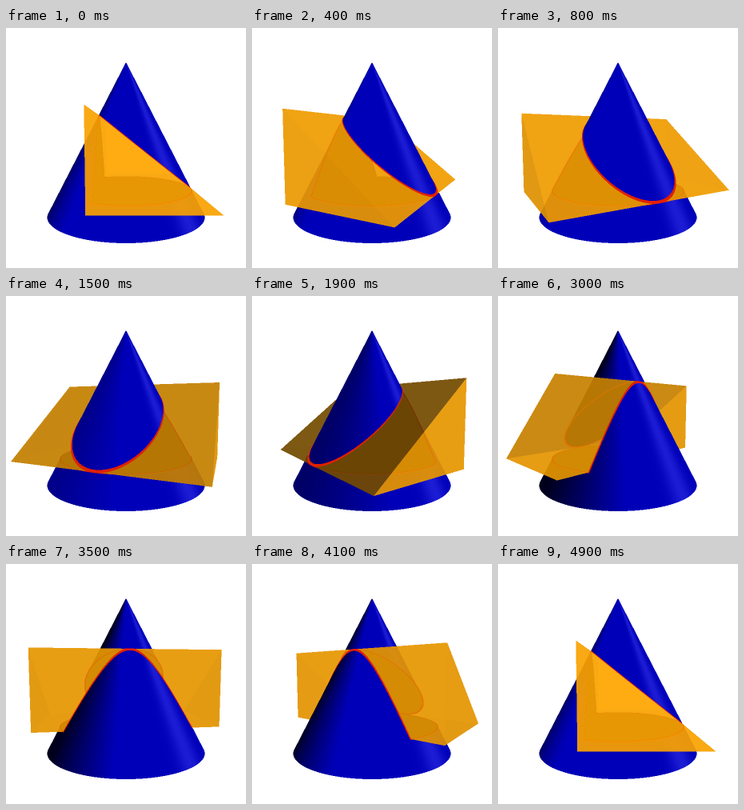
These frames come from a looping animation (300x300 px, 5 s). An HTML page with a canvas:

```html
<!DOCTYPE html>
<html lang="en">
<head>
<meta charset="utf-8">
<title>Cone cut by a wedge</title>
<style>
  html, body { margin: 0; width: 100%; height: 100%; overflow: hidden; background: #fff; }
  canvas { display: block; width: 300px; height: 300px; }
</style>
</head>
<body>
<canvas id="stage" width="300" height="300"></canvas>
<script>
const SIZE = 300, SUB = 2, STEPS = 50, STEP_MS = 100;

// Camera: distance from the axis, height, pitch, focal length, optical centre
const cam = { dist: 9.03, height: 1.99, pitch: 0.08, focal: 303, cx: 150, cy: 157.3 };

// Heights are measured from the floor of the wedge
const cone = { top: 4.6, base: -0.867, slope: 0.5217 };
const wedge = { left: -1, right: 2.41, half: 3.2, top: 2.7 };
const rise = wedge.top / (wedge.right - wedge.left);
const LINE = 0.021, ALPHA = 0.73;
const RED = [226, 30, 0], CUT = [0, 0, 50];

const clamp = (x, lo, hi) => Math.min(hi, Math.max(lo, x));
const dot = (a, b) => a[0] * b[0] + a[1] * b[1] + a[2] * b[2];
const at = (o, d, t) => [o[0] + d[0] * t, o[1] + d[1] * t, o[2] + d[2] * t];
const mix = (under, over, a) => under.map((c, i) => c + (over[i] - c) * a);

// Half spaces n.p <= d; light() takes the sideways part of the turned normal
const slantLen = Math.hypot(rise, 1);
const flat = () => 0.89;
const side = nx => 1 - 0.15 * Math.abs(nx);
const slant = nx => clamp(1.25 + 2 * nx, 0.35, 1) * 0.95;
const faces = [
  { n: [-1, 0, 0], d: -wedge.left, light: flat },
  { n: [0, 0, -1], d: 0, light: flat },
  { n: [0, 1, 0], d: wedge.half, light: side },
  { n: [0, -1, 0], d: wedge.half, light: side },
  { n: [rise / slantLen, 0, 1 / slantLen], d: rise * wedge.right / slantLen, light: slant }
];

let cs = 1, sn = 0;
const sideways = p => p[0] * cs - p[1] * sn;

function hitWedge(o, d) {
  let t0 = -Infinity, t1 = Infinity, into, out;
  for (const f of faces) {
    const slope = dot(f.n, d), gap = f.d - dot(f.n, o);
    if (Math.abs(slope) < 1e-9) {
      if (gap < 0) return null;
      continue;
    }
    const t = gap / slope;
    if (slope < 0) {
      if (t > t0) { t0 = t; into = f; }
    } else if (t < t1) { t1 = t; out = f; }
  }
  return t0 < t1 && t0 > 0 ? { t0, t1, into, out } : null;
}

function hitCone(o, d) {
  const kk = cone.slope ** 2, q = cone.top - o[2];
  const a = d[0] * d[0] + d[1] * d[1] - kk * d[2] * d[2];
  const b = o[0] * d[0] + o[1] * d[1] + kk * q * d[2];
  const c = o[0] * o[0] + o[1] * o[1] - kk * q * q;
  const disc = b * b - a * c;
  if (disc <= 0) return null;
  const root = Math.sqrt(disc);
  let t0 = (-b - root) / a, t1 = (-b + root) / a;
  if (o[2] + d[2] * t0 > cone.top) return null;
  if (Math.abs(d[2]) > 1e-9) {
    const tb = (cone.base - o[2]) / d[2];
    if (d[2] < 0) t1 = Math.min(t1, tb);
    else t0 = Math.max(t0, tb);
  }
  return t0 < t1 ? { t0, t1 } : null;
}

const nearCone = p => Math.abs((cone.top - p[2]) * cone.slope - Math.hypot(p[0], p[1])) < LINE;
const nearWedge = p => faces.every(f => dot(f.n, p) < f.d + LINE);

// Lit from the right, with a soft highlight there and a dark left edge
function coneColour(p) {
  if (nearWedge(p)) return RED;
  const r = Math.hypot(p[0], p[1]) + 1e-6;
  const x = sideways(p) / r;
  const shade = clamp(1 + 0.8 * (x + 0.25 + 0.5 * p[1] / r), 0.15, 1);
  const shine = 28 * Math.exp(-(((x - 0.68) / 0.13) ** 2));
  return [shine, shine, 184 * shade + shine];
}

function coat(under, face, o, d, t) {
  return nearCone(at(o, d, t)) ? mix(under, RED, 0.9) : mix(under, face.rgb, ALPHA);
}

function trace(o, d) {
  const w = hitWedge(o, d), c = hitCone(o, d);
  if (!w && !c) return null;
  let rgb = [255, 255, 255], stop = Infinity;
  if (c) {
    const swallowed = w && c.t0 >= w.t0 && c.t0 <= w.t1;
    if (!swallowed) {
      stop = c.t0;
      rgb = coneColour(at(o, d, stop));
    } else if (w.t1 < c.t1) {
      stop = w.t1;
      rgb = CUT;
    }
  }
  if (w) {
    if (w.t1 <= stop) rgb = coat(rgb, w.out, o, d, w.t1);
    if (w.t0 <= stop) rgb = coat(rgb, w.into, o, d, w.t0);
  }
  return rgb;
}

function render(angle) {
  const img = new ImageData(SIZE, SIZE), px = img.data.fill(255);
  cs = Math.cos(angle);
  sn = Math.sin(angle);
  for (const f of faces) {
    const l = f.light(sideways(f.n));
    f.rgb = [255 * l, 166 * l, 0];
  }
  const ce = Math.cos(cam.pitch), se = Math.sin(cam.pitch);
  const local = (x, y, z) => [x * cs + y * sn, y * cs - x * sn, z];
  const eye = local(0, cam.dist, cam.height);
  for (let y = 38; y < 275; y++) {
    for (let x = 0; x < SIZE; x++) {
      let r = 0, g = 0, b = 0;
      for (let s = 0; s < SUB * SUB; s++) {
        const sx = (x + (s % SUB + 0.5) / SUB - cam.cx) / cam.focal;
        const sy = (cam.cy - y - ((s / SUB | 0) + 0.5) / SUB) / cam.focal;
        const rgb = trace(eye, local(sx, -ce - sy * se, sy * ce - se));
        r += rgb ? rgb[0] : 255;
        g += rgb ? rgb[1] : 255;
        b += rgb ? rgb[2] : 255;
      }
      const i = (y * SIZE + x) * 4, n = SUB * SUB;
      px[i] = r / n;
      px[i + 1] = g / n;
      px[i + 2] = b / n;
    }
  }
  return img;
}

// Steady 7.5 degree steps, slightly shorter towards the end of the turn
const turn = k => (k <= 42 ? 7.5 * k : 315 + (k - 42) * 45 / 7) * Math.PI / 180;

const ctx = document.getElementById("stage").getContext("2d");
const cache = [];
let shown = -1;

function draw(now) {
  const k = Math.floor(now / STEP_MS) % STEPS;
  if (k !== shown) {
    cache[k] = cache[k] || render(turn(k));
    ctx.putImageData(cache[k], 0, 0);
    shown = k;
  }
}

let start = null;
function tick(now) {
  if (start === null) start = now;
  draw(Math.max(0, now - start));
  requestAnimationFrame(tick);
}
draw(0);
requestAnimationFrame(tick);
</script>
</body>
</html>
```
